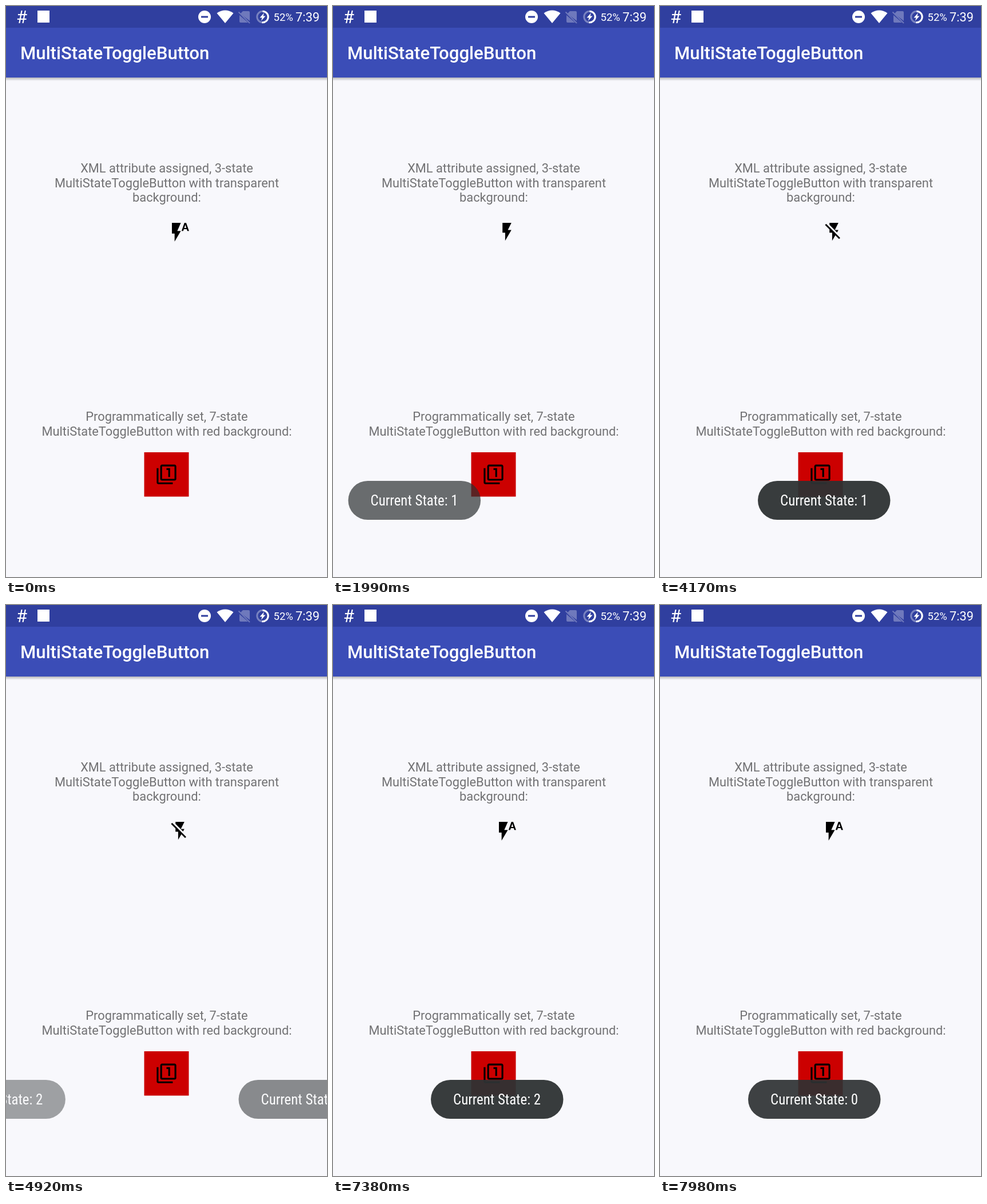
An HTML page for the animation above (8000 ms loop, 561x998 px).

```html
<!DOCTYPE html>
<html lang="en">
<head>
<meta charset="utf-8">
<title>MultiStateToggleButton</title>
<style>
  html, body { margin: 0; width: 100%; height: 100%; overflow: hidden; background: #f8f8fc; }
  svg { display: block; width: 561px; height: 998px; font-family: Roboto, sans-serif; }
  .white { fill: #fff; }
  .label { font-size: 21.8px; fill: #727274; text-anchor: middle; }
  .title { font-size: 31.2px; font-weight: 500; }
  .toast-text { font: 24.9px "Roboto Condensed", Roboto, sans-serif; font-stretch: 75%; text-anchor: middle; }
</style>
</head>
<body>
<svg viewBox="0 0 561 998">
  <defs>
    <linearGradient id="shade" x2="0" y2="1">
      <stop stop-color="#000" stop-opacity=".26"/>
      <stop offset="1" stop-color="#000" stop-opacity="0"/>
    </linearGradient>
  </defs>

  <rect width="561" height="998" fill="#f8f8fc"/>
  <rect y="125" width="561" height="6" fill="url(#shade)"/>
  <rect width="561" height="125" fill="#3b4db7"/>
  <rect width="561" height="38" fill="#303f9f"/>

  <!-- status bar -->
  <g class="white">
    <text x="18" y="30" font-size="31">#</text>
    <rect x="55" y="8" width="21" height="21"/>
    <circle cx="347" cy="19" r="11"/>
    <rect x="341" y="17.5" width="12" height="3" fill="#303f9f"/>
    <path d="M383 30 368.500 12.500Q383 2.500 397.500 12.500Z"/>
    <g opacity=".3">
      <path d="M414 9h10q2 0 2 2v15L409.500 13.500ZM408 16l15 13H410q-2 0-2-2Z"/>
      <path d="M406.500 10.500 426 30" fill="none" stroke="#fff" stroke-width="2"/>
    </g>
    <g fill="none" stroke="#fff" stroke-width="3">
      <circle cx="448.500" cy="19" r="9.700" opacity=".35"/>
      <path d="M448.500 9.300a9.700 9.700 0 1 1-1 19.350"/>
    </g>
    <path d="M451 12l-7.500 8.500h4L446 26l7.500-8.500h-4Z"/>
    <text x="467.500" y="26" font-size="18.500">52%</text>
    <text x="506" y="27" font-size="21.800">7:39</text>
    <text class="title" x="25" y="93">MultiStateToggleButton</text>
  </g>

  <g class="label">
    <text x="281" y="291">XML attribute assigned, 3-state</text>
    <text x="281" y="317">MultiStateToggleButton with transparent</text>
    <text x="281" y="342">background:</text>
    <text x="281" y="725">Programmatically set, 7-state</text>
    <text x="281" y="751">MultiStateToggleButton with red background:</text>
  </g>

  <path id="flash" transform="translate(285.300 376) scale(1.558)"/>

  <rect x="241.500" y="780" width="78" height="77.500" fill="#c00"/>
  <path transform="translate(261.800 800) scale(1.558)" d="M3 5H1v16c0 1.100.9 2 2 2h16v-2H3V5zm11 10h2V5h-4v2h2v8zm7-14H7c-1.100 0-2 .9-2 2v14c0 1.100.9 2 2 2h14c1.100 0 2-.9 2-2V3c0-1.100-.9-2-2-2zm0 16H7V3h14v14z"/>

  <g id="toasts"></g>
  <circle id="touch" cx="296.500" cy="398.500" r="17.200" fill="#fff" fill-opacity=".5" stroke="#cbc6ea" stroke-width="2"/>
</svg>
<script>
const LOOP = 8000, WIDTH = 561, ENTER = 540, EXIT = 480, FADE = 200;

const icons = {
  auto: 'M3 2v12h3v9l7-12H9l4-9H3zm16 0h-2l-3.200 9h1.900l.7-2h3.200l.7 2h1.900L19 2zm-2.150 5.650L18 4l1.150 3.650h-2.300z',
  on: 'M7 2v11h3v9l7-12h-4l4-8z',
  off: 'M3.270 3L2 4.270l5 5V13h3v9l3.580-6.140L17.730 20 19 18.730 3.270 3zM17 10h-4l4-8H7v2.180l8.460 8.460L17 10z'
};

// Each tap swaps the icon on release.
const taps = [
  { down: 1470, up: 1640, icon: 'on' },
  { down: 3440, up: 3680, icon: 'off' },
  { down: 5790, up: 6000, icon: 'auto' }
];
const toasts = [
  { state: 1, enter: 1725, exit: 4610 },
  { state: 2, enter: 4775, exit: 7380 },
  { state: 0, enter: 7535, exit: Infinity }
];

const $ = id => document.getElementById(id);
const clamp = v => Math.min(1, Math.max(0, v));

$('toasts').innerHTML = toasts.map(t => `<g>
  <rect x="171" y="830" width="231.500" height="68" rx="34" fill="#2e3233" fill-opacity=".95"/>
  <text class="toast-text white" x="286.500" y="873">Current State: ${t.state}</text></g>`).join('');
toasts.forEach((t, i) => t.node = $('toasts').children[i]);

function draw(now) {
  const time = now % LOOP;

  const last = taps.filter(t => time >= t.up).pop();
  $('flash').setAttribute('d', icons[last ? last.icon : 'auto']);

  const tap = taps.find(t => time >= t.down && time < t.up + FADE);
  $('touch').setAttribute('opacity', tap ? 1 - clamp((time - tap.up) / FADE) : 0);

  // Slide in from the left decelerating, slide out to the right accelerating.
  for (const t of toasts) {
    const left = (1 - clamp((time - t.enter) / ENTER)) ** 2;
    const right = clamp((time - t.exit) / EXIT) ** 2;
    t.node.setAttribute('transform', `translate(${WIDTH * (right - left)} 0)`);
    t.node.setAttribute('opacity', (1 - left) * (1 - right));
  }
}

const start = performance.now();
function tick() {
  draw(performance.now() - start);
  requestAnimationFrame(tick);
}
tick();
</script>
</body>
</html>
```
